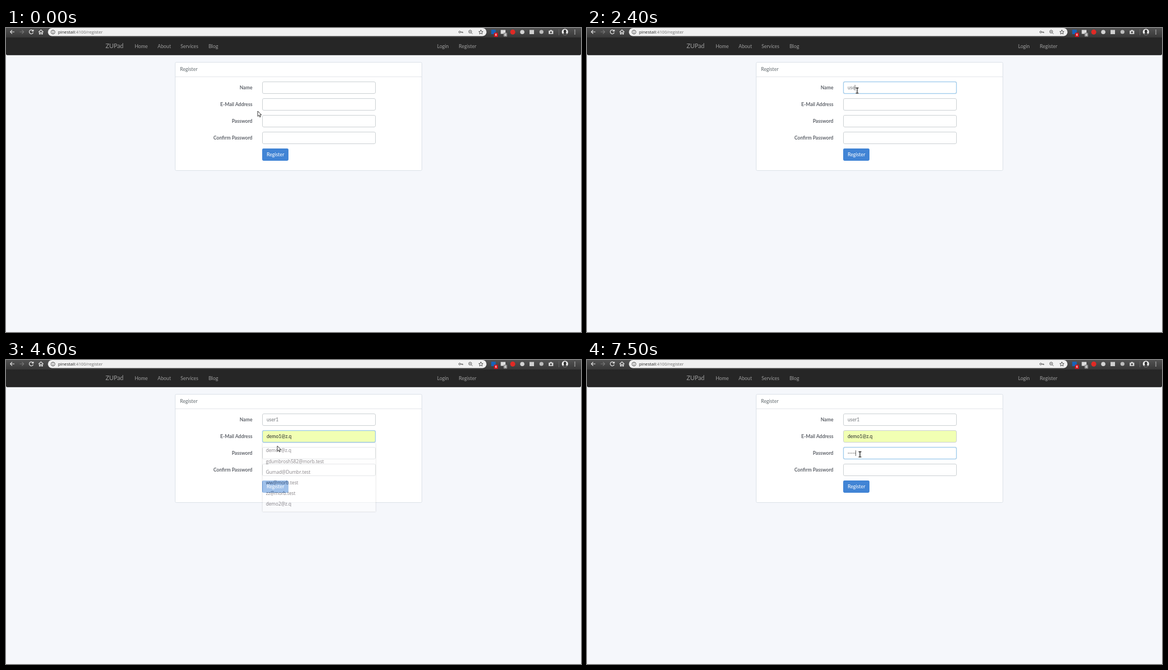
These frames come from a looping animation (1028x545 px, 8000 ms). An HTML page:

```html
<!DOCTYPE html>
<html lang="en">
<head>
<meta charset="utf-8">
<title>Register form</title>
<style>
html, body { margin: 0; width: 100%; height: 100%; overflow: hidden; background: #f5f7fb; }
svg { display: block; }
text { font: 8.8px Lato, sans-serif; fill: #636b6f; white-space: pre; }
.nav { fill: #9d9d9d; }
.brand { font-size: 10.8px; }
.label { font-size: 8.6px; font-weight: 700; text-anchor: end; fill: #60646b; }
.value { font-size: 8.6px; fill: #72767a; }
.url { font: 500 7.7px "Open Sans", sans-serif; fill: #222; }
.badge { font: 700 5px "Open Sans", sans-serif; fill: #fff; text-anchor: middle; }
.popup text { font: 500 8.3px "Open Sans", sans-serif; fill: #120a12; }
.popup text.foot { fill: #38383e; }
.popup { transform-box: fill-box; transform-origin: center; }
.sheet { fill: #fff; filter: drop-shadow(0 .6px .9px #0006); }
.line { fill: none; stroke: #e3e6ea; }
.field { fill: #fff; stroke: #cbd0d3; }
.icon { fill: none; stroke: #e4e4e4; stroke-width: 1.2; }
.dark { stroke: #555; stroke-width: 1; }
.dots { fill: none; stroke: #555; stroke-width: 1.6; stroke-linecap: round; stroke-dasharray: 0 2.9; }
</style>
</head>
<body>
<svg id="stage" width="1028" height="545" viewBox="0 0 1028 545">
  <defs>
    <linearGradient id="chrome" x2="0" y2="1">
      <stop stop-color="#525252"/><stop offset="1" stop-color="#383838"/>
    </linearGradient>
  </defs>
  <rect width="1028" height="545" fill="#f5f7fb"/>

  <rect width="1028" height="17" fill="url(#chrome)"/>
  <rect x="75" y="0" width="784" height="14.5" rx="7.2" fill="#f1f1f1"/>
  <path class="icon" d="M15 7H8M11 3.7 7.7 7l3.3 3.3M48.2 5A3.6 3.6 0 1 0 48.6 8M48.9 3V5.7H46M58.3 7.3 62.5 3.4l4.2 3.9M59.7 6.5V10.8H61.4V8H63.6V10.8H65.3V6.5"/>
  <path class="icon" style="stroke:#777" d="M24.5 7H31.5M28.5 3.7 31.8 7l-3.3 3.3"/>
  <path class="icon dark" d="M80.5 7.3a3.5 3.5 0 1 0 7 0a3.5 3.5 0 1 0-7 0M84 6.8V9.4M84 5V5.9"/>
  <text class="url" x="93" y="10">pinestall<tspan fill="#6c6c6c">:4100/register</tspan></text>
  <path class="icon dark" d="M809.5 7.2a1.6 1.6 0 1 0 3.2 0a1.6 1.6 0 1 0-3.2 0M812.7 7.2H816.7V9M815 7.2V8.8M827.3 6.5a2.6 2.6 0 1 0 5.2 0a2.6 2.6 0 1 0-5.2 0M831.9 8.5 834 10.7M828.7 6.5H831.1M849 3.4 850.1 6.1 852.9 6.3 850.8 8.1 851.4 10.9 849 9.4 846.6 10.9 847.2 8.1 845.1 6.3 847.9 6.1Z"/>

  <rect x="867.5" y="3" width="8" height="8" fill="#1764b8"/>
  <rect x="872.5" y="8.5" width="7" height="7.5" rx="1" fill="#d8121c"/>
  <text class="badge" x="876" y="14">6</text>
  <rect x="884.5" y="3.5" width="8.5" height="7" fill="#dedede"/>
  <rect x="889.5" y="8.5" width="6.5" height="7" rx="1" fill="#8b8b8b"/>
  <text class="badge" x="892.7" y="13.8">0</text>
  <circle cx="906" cy="7.2" r="4.5" fill="#e02a25"/>
  <circle cx="923" cy="7.2" r="3.8" fill="#d3d3d3"/>
  <rect x="936" y="3.5" width="8" height="7.5" fill="#d0d0d0"/>
  <circle cx="957.3" cy="7" r="3.6" fill="#bdbdbd"/>
  <path fill="#d8d8d8" d="M970.2 4.8H972.2L973 3.4H975.6L976.4 4.8H978.4V10.8H970.2Z"/>
  <circle cx="974.3" cy="7.7" r="1.7" fill="#444"/>
  <path stroke="#666" d="M988.5 2V13"/>
  <circle cx="999.3" cy="7" r="5.6" fill="#eee"/>
  <path fill="#333" d="M997 5.2a2.3 2.3 0 0 1 4.6 0V7.2a2.3 2.3 0 0 1-4.6 0ZM995 10.6Q999.3 7.8 1003.6 10.6Q999.3 14.2 995 10.6Z"/>
  <path stroke="#e4e4e4" stroke-width="1.7" stroke-linecap="round" stroke-dasharray="0 3.2" d="M1017 4V10.6"/>

  <path fill="#262626" d="M0 17H1028V46.4Q1028 48.4 1026 48.4H2Q0 48.4 0 46.4Z"/>
  <path stroke="#101010" stroke-width=".7" d="M1.5 48H1026.5"/>
  <text class="nav brand" x="178" y="36.4">ZUPad</text>
  <g id="links"></g>

  <rect x="302.5" y="61.5" width="441" height="194" rx="2" fill="#fff" stroke="#dbe1e8"/>
  <path class="line" d="M303 87.5H743"/>
  <text x="311" y="77">Register</text>
  <g id="rows"></g>
  <rect x="458" y="216" width="47" height="22" rx="2.4" fill="#4184d5"/>
  <text x="466" y="230" style="fill:#fff">Register</text>

  <g id="glow" fill="none" stroke="#9dcaec">
    <rect x="458.5" y="96.5" width="202" height="21" rx="2.4" stroke-width="3" opacity=".15"/>
    <rect x="458.5" y="96.5" width="202" height="21" rx="2.4"/>
  </g>
  <text class="value" id="name" x="466" y="109.7"></text>
  <text class="value" id="email" x="466" y="139.7" style="fill:#26282a"></text>
  <path class="dots" id="dots"/>
  <rect id="caret" width=".9" height="10" fill="#555"/>
  <g id="popups"></g>

  <path id="arrow" d="M0 0V9.4L2.2 7.4 3.8 10.8 5.3 10.1 3.8 6.8H6.8Z" fill="#fff" stroke="#222" stroke-width=".9"/>
  <g id="beam" fill="none">
    <path d="M-2.5-4.5H2.5M0-4.5V4.8M-2.5 4.8H2.5" stroke="#fff" stroke-width="2.6" opacity=".8"/>
    <path d="M-2.5-4.5H2.5M0-4.5V4.8M-2.5 4.8H2.5" stroke="#222" stroke-width="1.3"/>
  </g>
</svg>
<script>
const LOOP = 8000, PITCH = 30, FIELD_TOP = 96;
const $ = id => document.getElementById(id);
const text = (x, y, str, cls = '') => `<text class="${cls}" x="${x}" y="${y}">${str}</text>`;
const show = (el, on) => el.style.display = on ? '' : 'none';

$('links').innerHTML = [[230, 'Home'], [271, 'About'], [312, 'Services'], [362, 'Blog'], [770.7, 'Login'], [809.5, 'Register']]
  .map(([x, label]) => text(x, 35.8, label, 'nav')).join('');

$('rows').innerHTML = ['Name', 'E-Mail Address', 'Password', 'Confirm Password'].map((label, i) => {
  const top = FIELD_TOP + i * PITCH;
  return text(440.5, top + 13.7, label, 'label') +
    `<rect class="field" x="458.5" y="${top + .5}" width="202" height="21" rx="2.4"/>`;
}).join('');

function popup(row, items, footer, extra = '') {
  const top = FIELD_TOP + row * PITCH;
  const centre = i => top + 36 + i * 19.35;
  const last = centre(items.length - 1);
  const bottom = last + (footer ? 36 : 13.5);
  const x = extra ? 477 : 464;
  return `<g class="popup"><rect class="sheet" x="458" y="${top + 22.5}" width="203.5" height="${bottom - top - 22.5}"/>` +
    (footer ? `<rect x="458" y="${last + 14}" width="203.5" height="22" fill="#f7f8f9"/>
      <path class="line" d="M458 ${last + 14}H661.5"/>${text(464, last + 28, footer, 'foot')}` : '') +
    items.map((item, i) => text(x, centre(i) + 3, item)).join('') + extra + '</g>';
}

const savedLogin = `<circle cx="468.2" cy="192" r="3.6" fill="#45454d"/>
  <path d="M466 190.5l2.3-.8 .6 1.5-1.6 1.2ZM469 192.6l1.6-.8-.3 2.2-1.2 .5Z" fill="#fff"/>
  <path class="dots" style="stroke:#333;stroke-width:2;stroke-dasharray:0 3.3" d="M621.2 192h33.1"/>`;

$('popups').innerHTML =
  popup(0, ['Gumadon el-dumbrosh', 'mmm mm', 'Gumadon', 'kk kkkk', 'zwtqx el-dumbrosh'], 'Manage…') +
  popup(1, ['demo1@z.q', 'gdumbrosh582@morb.test', 'Gumad@Dumbr.test', 'ww@morb.test', 'zz@morb.test', 'demo2@z.q']) +
  popup(2, ['No username'], 'Manage passwords…', savedLogin);

const popups = [...$('popups').children];
const fields = document.querySelectorAll('.field');

// Each step changes part of the form state from its time on.
const initial = { name: '', email: '', dots: 0, focus: 0, glow: 0, caret: false, popup: 0, x: 450, y: 149, arrow: true };
const steps = [
  [1000, { caret: true, x: 483, y: 112, arrow: false }],
  [1100, { glow: .6 }],
  [1200, { glow: 1, popup: 1 }],
  [1600, { caret: false }],
  [2000, { name: 'u', caret: true, popup: .82 }],
  [2100, { popup: .4 }],
  [2200, { name: 'us', popup: 0 }],
  [2400, { name: 'use' }],
  [3400, { name: 'user1', caret: false, y: 115 }],
  [3600, { x: 482, y: 136 }],
  [4100, { focus: 1, glow: .6, caret: true, popup: 1, y: 146 }],
  [4600, { email: 'demo1@z.q', glow: 1, caret: false, popup: .5, x: 485, y: 154, arrow: true }],
  [5000, { popup: 0, x: 488, y: 169, arrow: false }],
  [5400, { focus: 2, glow: .6, caret: true, popup: 1 }],
  [6200, { dots: 1, glow: 1, popup: .15 }],
  [6500, { dots: 2, popup: 0 }],
  [6800, { dots: 3 }],
  [7100, { dots: 4 }],
  [7500, { dots: 5 }]
];

function stateAt(t) {
  const s = Object.assign({}, initial, ...steps.filter(([at]) => t >= at).map(([, change]) => change));
  if (t < 1000) {
    // The pointer glides to the first field, updating ten times a second.
    const p = Math.max(0, Math.floor(t / 100) - 1) / 8;
    const eased = 1 - (1 - p) ** 2;
    s.x = 450 + 33 * eased;
    s.y = 149 - 37 * eased;
    const inField = (s.y - FIELD_TOP) % PITCH < 22;
    s.arrow = s.x < 458 || !inField;
  }
  return s;
}

function render(t) {
  const s = stateAt(t);
  const offset = s.focus * PITCH;
  $('name').textContent = s.name;
  $('email').textContent = s.email;
  fields[1].style.fill = s.email ? '#f1ffb3' : '';
  $('dots').setAttribute('d', s.dots ? `M467.3 167h${2.9 * s.dots - 2.8}` : '');

  $('glow').setAttribute('transform', `translate(0 ${offset})`);
  $('glow').setAttribute('opacity', s.glow);
  const typed = [s.name ? $('name').getComputedTextLength() : 0, 0, 2.9 * s.dots][s.focus];
  $('caret').setAttribute('x', 465.6 + typed);
  $('caret').setAttribute('y', 102 + offset);
  show($('caret'), s.caret);

  popups.forEach((el, i) => {
    show(el, i === s.focus && s.popup > 0);
    el.style.opacity = s.popup;
    el.style.transform = s.popup < 1 ? 'scale(.993)' : '';
  });

  for (const id of ['arrow', 'beam']) {
    show($(id), s.arrow === (id === 'arrow'));
    $(id).setAttribute('transform', `translate(${s.x} ${s.y})`);
  }
}

function tick() {
  render(performance.now() % LOOP);
  requestAnimationFrame(tick);
}
tick();
</script>
</body>
</html>
```
